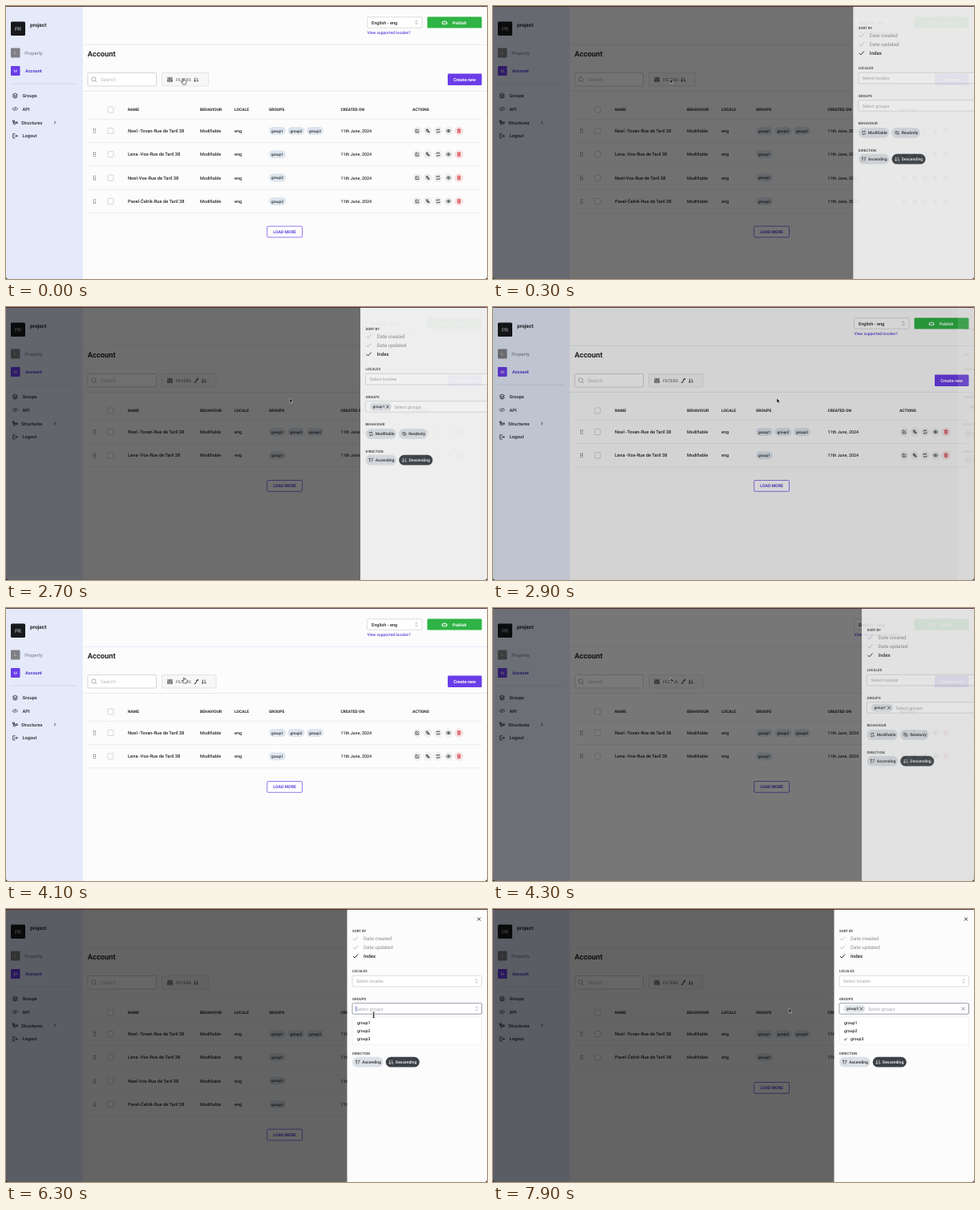
An HTML page that plays this animation: 600 px wide and 341 px high, repeating every 8 s.

```html
<!DOCTYPE html>
<html lang="en">
<head>
<meta charset="utf-8">
<title>Account filters</title>
<style>
  html, body { margin: 0; height: 100%; overflow: hidden; background: #fcfcfc; }
  svg { display: block; width: 100vw; height: 100vh; font-family: Roboto, sans-serif; text-rendering: geometricPrecision; }
  text { white-space: pre; }
</style>
</head>
<body>
<svg id="stage" viewBox="0 0 600 341"></svg>
<script>
const LOOP = 8000, STEP = 100;
const PURPLE = '#6a3de8', INK = '#26282c', GREY = '#a6a6a6', LINE = '#cfcfcf';

// Drawing helpers
const text = (x, y, s, size = 5.6, fill = INK, weight = 500, anchor = 'start') =>
  `<text x="${x}" y="${y}" font-size="${size}" fill="${fill}" font-weight="${weight}" text-anchor="${anchor}">${s}</text>`;
const box = (x, y, w, h, fill, r = 0, stroke = 'none') =>
  `<rect x="${x}" y="${y}" width="${w}" height="${h}" rx="${r}" fill="${fill}" stroke="${stroke}" stroke-width=".7"/>`;
const icon = (x, y, d, color = INK, width = .8, fill = 'none') =>
  `<path transform="translate(${x} ${y})" d="${d}" fill="${fill}" stroke="${color}" stroke-width="${width}"/>`;
const rule = (x1, x2, y, color) => box(x1, y - .4, x2 - x1, .8, color);

const ICON = {
  check: 'M-3 .2L-1 2.2 3-2.2',
  cross: 'M-2-2L2 2M2-2L-2 2',
  updown: 'M-1.3-.9L0-2.2 1.3-.9M-1.3 .9L0 2.2 1.3 .9',
  chevron: 'M-.9-1.7L.9 0-.9 1.7',
  search: 'M1.4 1.4L3 3M2-.6A2.6 2.6 0 1 1-3.2-.6 2.6 2.6 0 1 1 2-.6',
  sliders: 'M-2.3-3.2V3.2M0-3.2V3.2M2.3-3.2V3.2M-3.2 1.2H-1.4M-.9-1.2H.9M1.4 1.2H3.2',
  sort: 'M-1.7-2.3V2.3M-2.7 1.2L-1.7 2.4-.7 1.2M.4-1.8H1.6M.4 0H2.3M.4 1.8H2.9',
  sortUp: 'M-1.7 2.3V-2.3M-2.7-1.2L-1.7-2.4-.7-1.2M.4-1.8H2.9M.4 0H2.3M.4 1.8H1.6',
  path: 'M-2.5 2.3H-.8L.8-2H2.5M1.4-2.8L2.6-2 1.4-1.2',
  edit: 'M.2-1.8H-2V2H1.8V0M-.6 .6L2.2-2.2',
  translate: 'M-2.3-1.7H.6M-.9-2.4V-1.7M.2-1.7L-2 .8M-1.7-1L.2 .8M-.2 2.3L1.1-.5 2.4 2.3M.3 1.4H1.9',
  swap: 'M-2-.3V-1.7H1.6M.8-2.5L1.7-1.7 .8-.9M2 .3V1.7H-1.6M-.8 .9L-1.7 1.7-.8 2.5',
  eye: 'M-2.8 0Q0-3.4 2.8 0 0 3.4-2.8 0M-.7 0A.7 .7 0 1 0 .7 0 .7 .7 0 1 0-.7 0',
  slash: 'M-2.8 0Q0-3.4 2.8 0 0 3.4-2.8 0M-2.3-2.3L2.3 2.3',
  trash: 'M-2.2-1.6H2.2M-.8-1.7V-2.4H.8V-1.7M-1.6-1.4L-1.4 2.3H1.4L1.6-1.4M-.5-.4V1.3M.5-.4V1.3',
  layers: 'M-3-1.4L0-2.9 3-1.4 0 .1ZM-3 .2L0 1.7 3 .2M-3 1.7L0 3.1 3 1.7',
  code: 'M-1.4-1.9L-3.1 0-1.4 1.9M1.4-1.9L3.1 0 1.4 1.9M.6-2.5L-.6 2.5',
  tree: 'M-3-2.5H-.8V-.8H-3ZM.8-.6H3V1H.8ZM-1.9-.8V2.2H.8M-1.9 .2H.8',
  logout: 'M.2-2.6H-2.6V2.6H.2M-1 0H3M1.6-1.5L3.1 0 1.6 1.5',
  robot: 'M-2.5-1.2H2.5V2H-2.5ZM0-1.2V-2.9M-3.3-.2V1.1M3.3-.2V1.1M-1 .3V1M1 .3V1'
};

const ROWS = [
  ['Noel -Tovan-Rue de Taril 38', [1, 2, 3]],
  ['Lena -Vox-Rue de Taril 38', [1]],
  ['Noel-Vox-Rue de Taril 38', [2]],
  ['Pavel-Čelrik-Rue de Taril 38', [3]]
];

const checkbox = y => box(127, y - 3.5, 7, 7, '#fff', 1, '#c2c2c2');
const groupTag = (x, y, n) => box(x, y - 5, 21, 10, '#dde6ee', 5) + text(x + 10.5, y + 1.7, 'group' + n, 4.7, INK, 500, 'middle');

function tableRow([name, groups], i) {
  const y = 156 + i * 29.3;
  let s = '';
  for (const dx of [0, 2.2]) for (const dy of [-2.2, 0, 2.2]) s += box(108.9 + dx, y + dy - .5, 1.1, 1.1, '#444', .5);
  s += checkbox(y) + text(152, y + 2, name, 5.75) + text(242, y + 2, 'Modifiable', 5.5) + text(285, y + 2, 'eng', 5.5);
  groups.forEach((n, k) => s += groupTag(328 + k * 23.5, y, n));
  s += text(417.5, y + 2, '11th June, 2024', 5.35);
  ['edit', 'translate', 'swap', 'eye', 'trash'].forEach((name, k) => {
    const x = 513 + k * 13, red = name === 'trash';
    s += box(x - 5.5, y - 5.5, 11, 11, red ? '#f6e2e3' : '#f0f0f0', 5.5) + icon(x, y, ICON[name], red ? '#d6303a' : INK, .75);
  });
  return s + rule(102, 594, y + 14.6, '#ebebeb');
}

function sidebar() {
  let s = box(0, 0, 95.8, 341, '#e5eafa') + box(6, 19.5, 18, 17.5, '#18191c', 1.5)
    + text(15, 31, 'PR', 6.4, '#c8c8cc', 400, 'middle') + text(30, 25.5, 'project', 6.5, INK, 700)
    + box(6, 52.5, 11.5, 12, '#808086', 1) + text(11.7, 60.4, 'L', 5, '#ddd', 400, 'middle')
    + text(23.3, 60.8, 'Property', 5.9, '#6f7380', 400)
    + box(6, 75, 11.5, 12, PURPLE, 1) + text(11.7, 82.9, 'M', 5, '#eee', 400, 'middle')
    + text(24, 83.1, 'Account', 5.5, '#4c35d0', 700) + rule(6, 88, 97, '#cbd1e6');
  [['Groups', 'layers', 112], ['API', 'code', 128.5], ['Structures', 'tree', 145.5], ['Logout', 'logout', 162.3]]
    .forEach(([label, name, y]) => s += icon(11.3, y, ICON[name]) + text(label === 'Structures' ? 19 : 20.5, y + 2.1, label, 5.7));
  return s + icon(61, 145.5, ICON.chevron);
}

function page(group) {
  const rows = ROWS.filter(([, groups]) => !group || groups.includes(group));
  const moreY = 282 - (4 - rows.length) * 29.3;
  const heads = { 152: 'NAME', 242: 'BEHAVIOUR', 285: 'LOCALE', 328: 'GROUPS', 417.5: 'CREATED ON', 507: 'ACTIONS' };
  let s = box(0, 0, 600, 341, '#fcfcfc') + sidebar()
    + box(450.5, 13.8, 68.5, 13.4, '#fff', 1.3, LINE) + text(456, 22.6, 'English - eng') + icon(512, 20.5, ICON.updown, '#666', .6)
    + text(450.5, 35, 'View supported locales?', 4.95, '#5a42dc')
    + box(525.5, 13.5, 68, 14, '#2fb344', 1.3) + icon(547, 20.8, ICON.robot, '#fff') + text(557, 22.5, 'Publish', 5.2, '#fff', 700)
    + rule(96, 600, 48.2, '#e0e6f7') + text(101.7, 63.3, 'Account', 9.4, INK, 700)
    + box(102, 83.5, 85.5, 16.5, '#fff', 1.3, '#c4c4c4') + icon(110, 92, ICON.search, '#8a8a8a', .7) + text(118, 94.3, 'Search', 6.2, '#bcbcbc', 400)
    + box(194.5, 83.5, group ? 67.5 : 58, 16.5, '#f7f7f7', 1.3, '#dadada') + icon(204.5, 92, ICON.sliders, INK, 1)
    + text(212, 94, 'FILTERS', 5.1, '#77797d') + (group ? icon(237.3, 92, ICON.path, INK, 1) : '')
    + icon(group ? 247 : 237.3, 92, ICON.sort)
    + box(551, 84.5, 42.5, 14.5, PURPLE, 1.3) + text(572.2, 93.8, 'Create new', 5.5, '#fff', 700, 'middle')
    + rule(96, 600, 106.3, '#dfe4f5') + checkbox(129.5) + rule(102, 594, 141.3, '#ebebeb');
  for (const x in heads) s += text(x, 130.6, heads[x], 4.95, INK, 700);
  return s + rows.map(tableRow).join('') + box(325.7, moreY - 6.9, 43.8, 13.8, '#fff', 1.3, PURPLE)
    + text(347.6, moreY + 1.9, 'LOAD MORE', 5.2, '#5a42dc', 700, 'middle');
}

const pill = (x, y, w, name, label, dark) => box(x, y - 6.4, w, 12.8, dark ? '#3b4146' : '#dce1e6', 6.4)
  + icon(x + 6.8, y, ICON[name], dark ? '#fff' : INK, .7) + text(x + 12.2, y + 1.9, label, 5, dark ? '#fff' : INK);

function drawer(group, listOpen) {
  const label = (y, s) => text(432, y, s, 4.4, '#33363a');
  let s = box(425.5, 0, 175, 341, '#fcfcfc') + icon(590, 12.6, ICON.cross, INK, .9) + label(28.6, 'SORT BY');
  ['Date created', 'Date updated', 'Index'].forEach((name, i) => {
    const y = 37 + i * 11, on = i === 2;
    s += icon(436, y - .2, ICON.check, on ? INK : '#b5b5b5', on ? 1 : .8) + text(446, y + 2, name, 6.2, on ? INK : '#8b8b8b', on ? 500 : 400);
  });
  s += label(79.2, 'LOCALES') + box(432, 83.3, 161.5, 13.6, '#fff', 1.3, LINE) + text(437, 92, 'Select locales', 5.5, GREY, 400)
    + icon(587, 90, ICON.updown, '#777', .6)
    + label(114, 'GROUPS') + box(432, 117.7, 161.5, 13.5, '#fff', 1.3, listOpen ? '#70768a' : LINE)
    + text(group ? 468 : 437, 126.5, 'Select groups', 5.5, GREY, 400);
  if (group) s += box(437, 119.8, 27.5, 9.6, '#e2e7eb', 4.8) + text(441, 126.2, 'group' + group, 4.7)
    + icon(459.5, 124.6, ICON.cross, INK, .8) + icon(586.5, 124.6, ICON.cross, '#666', .7);
  else s += icon(587, 124.5, ICON.updown, '#777', .6) + (listOpen ? box(436.4, 121, .7, 7, '#4454c4') : '');
  s += label(148.4, 'BEHAVIOUR') + pill(432, 158.4, 38.3, 'swap', 'Modifiable') + pill(473.5, 158.4, 35.5, 'slash', 'Readonly')
    + label(181.6, 'DIRECTION') + pill(432, 191.2, 38.5, 'sortUp', 'Ascending') + pill(473.7, 191.2, 42, 'sort', 'Descending', true);
  if (listOpen) {
    s += box(432, 135, 161.5, 34.3, '#fff', 1, '#ebebeb');
    for (const n of [1, 2, 3]) {
      const y = 133.8 + n * 10.2, on = n === group;
      s += (on ? icon(439.7, y - 1.8, 'M-1.8 .2L-.6 1.4 1.8-1.4') : '') + text(on ? 446 : 438, y, 'group' + n, 5.2);
    }
  }
  return s;
}

// Motion
function ease(t) { // cubic-bezier(.25, .1, .25, 1)
  const bez = (u, a, b) => 3 * u * (1 - u) ** 2 * a + 3 * u * u * (1 - u) * b + u ** 3;
  let lo = 0, hi = 1;
  for (let i = 0; i < 20; i++) {
    const u = (lo + hi) / 2;
    bez(u, .25, .25) < t ? lo = u : hi = u;
  }
  return bez(lo, .1, 1);
}
const ramp = (t, start, span = 400) => ease(Math.min(1, Math.max(0, (t - start) / span)));
const within = (t, ...spans) => spans.some(([from, to]) => t >= from && t < to);

const POINTER = [
  [0, 221, 91], [350, 221, 91], [1000, 458, 126], [1450, 458, 126], [1800, 447, 142], [2050, 447, 142], [2500, 354, 114],
  [3200, 354, 114], [4000, 222, 87], [4350, 222, 87], [5000, 458, 126], [5700, 458, 126], [5800, 458, 132],
  [6300, 458, 132], [7100, 451, 164], [7700, 451, 164], [7900, 369, 124], [8000, 369, 124]
];

function pointer(t) {
  const k = POINTER.findIndex(p => p[0] > t);
  const [t0, x0, y0] = POINTER[k - 1], [t1, x1, y1] = POINTER[k];
  const u = (t - t0) / (t1 - t0), e = u * u * (3 - 2 * u);
  const x = x0 + (x1 - x0) * e, y = y0 + (y1 - y0) * e;
  if (within(t, [0, 200], [3900, 4200], [1700, 2100], [4900, 5700], [6900, 7700]))
    return icon(x, y, 'M-.7 .6Q0-.5 .7 .6V2.6Q2-.1 3.5 2.8L4 3.6V5L3 7H-.3L-2.4 4Q-2.2 2.8-.7 4.2Z', '#111', .6, '#fff');
  if (within(t, [900, 1600], [5700, 6600]))
    return icon(x + .6, y - 3, 'M-1.2 0H1.2M0 0V6.5M-1.2 6.5H1.2M-1 4.3H1', '#111', .8);
  return icon(x, y, 'M0 0V5.8L1.4 4.6 2.3 6.6 3.2 6.2 2.3 4.2H4.1Z', '#fff', .4, '#111');
}

function scene(t) {
  const group = within(t, [2000, 5600]) ? 1 : t >= 7500 ? 3 : 0;
  const listOpen = within(t, [1000, 2660], [5900, LOOP]);
  const shown = t < 4100 ? ramp(t, 72) - ramp(t, 2660) : ramp(t, 4100);
  let s = page(group);
  if (shown > 0) s += `<rect width="600" height="341" opacity="${.6 * shown ** .6}"/>`
    + `<g transform="translate(${174.5 * (1 - shown)} 0)" opacity="${shown}">${drawer(group, listOpen)}</g>`;
  return s + box(0, 0, 600, .9, '#4a2626') + icon(0, 341, 'M0-3V0H3A3 3 0 0 1 0-3M600-3V0H597A3 3 0 0 0 600-3', 'none', 0, '#111') + pointer(t);
}

const stage = document.getElementById('stage');
let drawn = -1;
function tick() {
  const t = Math.floor(performance.now() % LOOP / STEP) * STEP;
  if (t !== drawn) stage.innerHTML = scene(drawn = t);
  requestAnimationFrame(tick);
}
tick();
</script>
</body>
</html>
```
